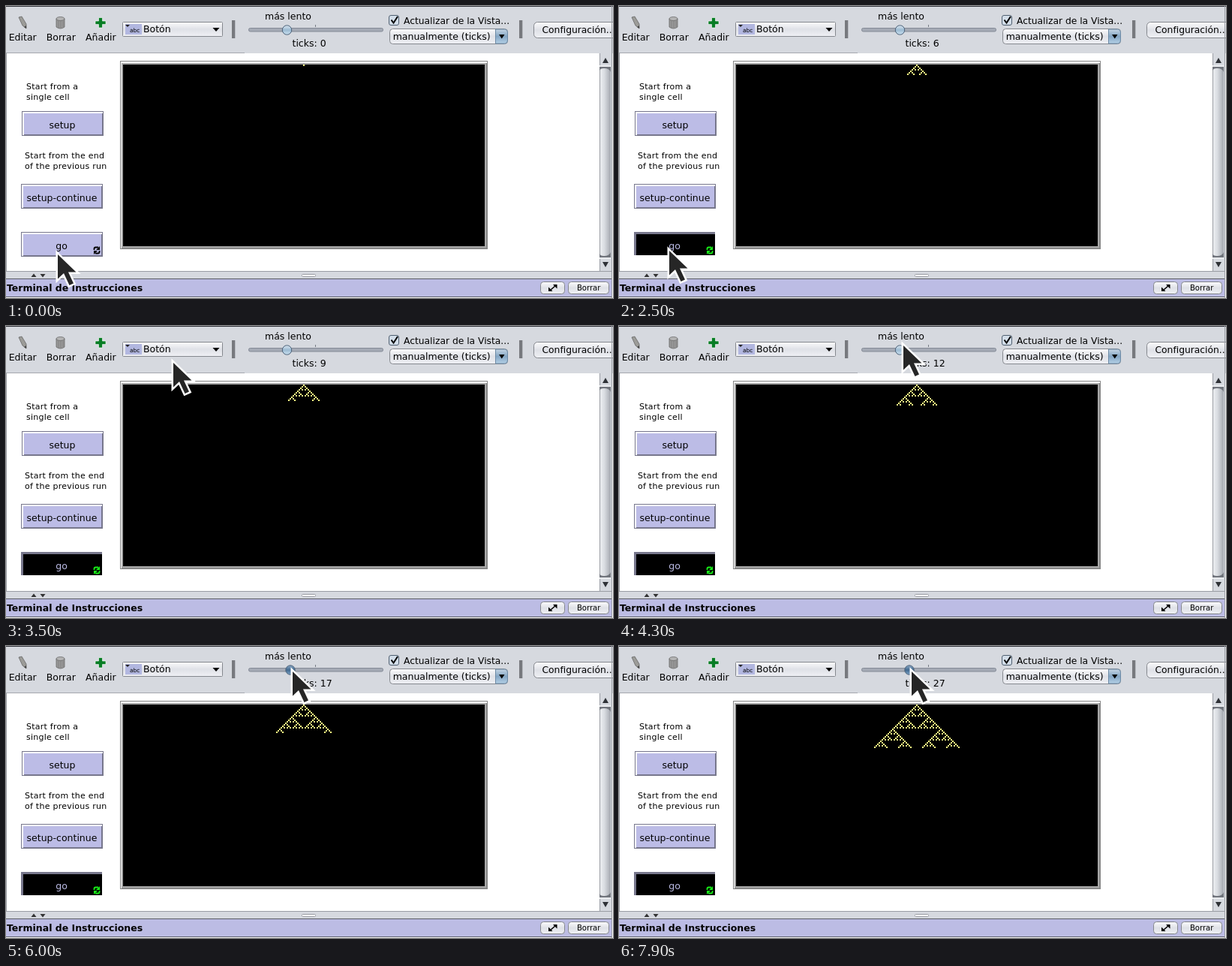
Write an HTML page that moves like this. It is 809x389 px and loops after 8 s.

```html
<!DOCTYPE html>
<html lang="es">
<head>
<meta charset="utf-8">
<title>Cellular automaton</title>
<style>
  html, body { margin: 0; width: 100%; height: 100%; overflow: hidden; background: #fff; }
  svg { display: block; width: 809px; height: 389px; }
  text { font: 12.5px "DejaVu Sans", sans-serif; fill: #000; white-space: pre; }
  .note { font-size: 11px; letter-spacing: .25px; }
  .small { font-size: 10px; }
  .bold { font-weight: bold; }
  .mid { text-anchor: middle; }
  .crisp { shape-rendering: crispEdges; }
  .nimbus { fill: url(#button); stroke: #85888e; }
  .pressed .up, .down { display: none; }
  .pressed .down { display: inline; }
  .pressed text { fill: #bcbce6; }
  .loop { color: #000; }
  .pressed .loop { color: #18f018; }
</style>
</head>
<body>
<svg viewBox="0 0 809 389">
  <defs>
    <linearGradient id="button" x2="0" y2="1">
      <stop offset="0" stop-color="#fbfbfc"/><stop offset=".5" stop-color="#dfe1e7"/><stop offset="1" stop-color="#eff0f4"/>
    </linearGradient>
    <linearGradient id="blue" x2="0" y2="1">
      <stop offset="0" stop-color="#c5d5e4"/><stop offset=".5" stop-color="#84a6c4"/><stop offset="1" stop-color="#b4d0e6"/>
    </linearGradient>
    <linearGradient id="thumb">
      <stop offset="0" stop-color="#eceef1"/><stop offset=".4" stop-color="#d9dce1"/><stop offset="1" stop-color="#a4a8b0"/>
    </linearGradient>
    <linearGradient id="knobLight" x2="0" y2="1">
      <stop offset="0" stop-color="#dbe6f0"/><stop offset=".5" stop-color="#9cbbd3"/><stop offset="1" stop-color="#cbe2f2"/>
    </linearGradient>
    <linearGradient id="knobDark" x2="0" y2="1">
      <stop offset="0" stop-color="#8aa8c6"/><stop offset=".5" stop-color="#41698f"/><stop offset="1" stop-color="#7ba4c8"/>
    </linearGradient>
    <g id="raised" class="crisp">
      <path fill="#77778c" d="M0 0h109v33h-109z"/>
      <path fill="#fff" d="M1 1h107v2h-105v29h-2z"/>
      <path fill="#bcbce6" d="M3 3h104v28h-104z"/>
    </g>
    <g id="turn">
      <path d="M117.500 325v-1.500q0-2 2-2h3.500" fill="none" stroke="currentColor" stroke-width="1.800"/>
      <path d="M125 320v5h-5z" fill="currentColor"/>
    </g>
  </defs>

  <!-- toolbar -->
  <g class="crisp">
    <path fill="#fff" d="M0 0h809v389h-809z"/>
    <path fill="#d6d9df" d="M0 0h809v63h-809z"/>
    <path fill="#33353d" d="M0 0h809v1h-809z"/>
    <path fill="#a5a8af" d="M0 62h318v1h-318z"/>
    <path fill="#77797e" d="M301 19h5v24h-5zM684 19h5v24h-5z"/>
    <path fill="#b8bbc1" d="M305 19h1v24h-1zM688 19h1v24h-1z"/>
  </g>
  <path d="M17 15l4-1 6 10 0 6-5-4z" fill="#9c9c98" stroke="#666" stroke-width=".8"/>
  <path d="M24 28l3 2 0-4z" fill="#444"/>
  <g stroke="#666" stroke-width=".8">
    <path d="M67 17v11q5.500 4 11 0v-11z" fill="#999"/>
    <ellipse cx="72.500" cy="17" rx="5.500" ry="2.500" fill="#b4b4b4"/>
    <path d="M70 20v9M73 20v9M76 20v8" stroke="#7b7b7b"/>
  </g>
  <path d="M123.500 15.500h5v4.500h4.500v4.500h-4.500v4.500h-5v-4.500h-4.500v-4.500h4.500z" fill="#087d25" stroke="#fff" stroke-width=".6"/>
  <text x="3.700" y="46">Editar</text>
  <text x="53.700" y="46">Borrar</text>
  <text x="106" y="46">Añadir</text>

  <rect class="nimbus" x="155.500" y="21.500" width="133" height="19" rx="1"/>
  <path class="crisp" fill="#b2b7e0" d="M159 24h22v14h-22z"/>
  <path d="M159 25l3 3 3-3z" fill="#222"/>
  <text x="165" y="35" style="font-size:7.5px">abc</text>
  <text x="183" y="35">Botón</text>
  <path d="M275.500 29h9l-4.500 5z"/>

  <text x="345" y="18">más lento</text>
  <rect x="323.500" y="29.500" width="179" height="4.500" rx="2" fill="#a4aab5" stroke="#858b97"/>
  <path class="crisp" fill="#767b84" d="M412 25h1v3h-1z"/>
  <circle id="knob" cy="32" r="6.200" stroke="#4c6178"/>
  <text id="ticks" x="381.500" y="54">ticks: 0</text>

  <rect x="510.500" y="12.500" width="13" height="13" rx="2.500" fill="#d3dee9" stroke="#4f5f70"/>
  <path d="M513.500 18.500l3 4 5.500-8.500" fill="none" stroke="#000" stroke-width="2"/>
  <text x="530" y="24" style="font-size:12.300px">Actualizar de la Vista...</text>
  <rect class="nimbus" x="511.500" y="30.500" width="157" height="20" rx="4"/>
  <path d="M652.500 31h12q4 0 4 4v11q0 4-4 4h-12z" fill="url(#blue)" stroke="#6c8aa6"/>
  <path d="M657 38h7.500l-3.750 5.500z"/>
  <text x="515.700" y="45">manualmente (ticks)</text>
  <rect class="nimbus" x="703.500" y="21.500" width="120" height="21" rx="5"/>
  <text x="714.500" y="36" style="font-size:12.300px">Configuración..</text>

  <!-- scrollbar and window edges -->
  <g class="crisp">
    <path fill="#d6d9df" d="M791 63h16v290h-16z"/>
    <path fill="#9a9da4" d="M0 63h1v290h-1zM791 63h1v290h-1zM807 0h1v389h-1z"/>
  </g>
  <rect x="792" y="83" width="14" height="250" fill="url(#thumb)"/>
  <path d="M791 80h15v8q-2-5-9-5-5 0-6 3zM791 336h15v-8q-2 5-9 5-5 0-6-3z" fill="#70747c"/>
  <path d="M791 79h15v2h-15zM791 335h15v2h-15z" fill="#e9ebee"/>
  <path d="M795 76h8l-4-7zM795 341h8l-4 7z" fill="#2e3136"/>

  <!-- widgets -->
  <text class="note" x="27" y="111">Start from a</text>
  <text class="note" x="27" y="125">single cell</text>
  <use href="#raised" x="21" y="140"/>
  <text class="mid" x="75" y="163">setup</text>
  <text class="note" x="25" y="203">Start from the end</text>
  <text class="note" x="25" y="217">of the previous run</text>
  <use href="#raised" x="20" y="237"/>
  <text class="mid" x="74.500" y="260">setup-continue</text>
  <g id="go">
    <use class="up" href="#raised" x="20" y="301"/>
    <g class="down crisp">
      <path fill="#77778c" d="M20 301h108v31h-108z"/>
      <path fill="#000" d="M23 304h105v28h-105z"/>
    </g>
    <text class="mid" x="74" y="324">go</text>
    <g class="loop">
      <use href="#turn"/>
      <use href="#turn" transform="rotate(180 121 325.500)"/>
    </g>
  </g>

  <!-- world view -->
  <g class="crisp">
    <path fill="#858585" d="M152 73h490v251h-490z"/>
    <path fill="#fff" d="M153 74h488v249h-488z"/>
    <path fill="#8b8b8b" d="M154 321h485v-245h2v247h-487z"/>
    <path fill="#a8a8a8" d="M154 76h486v246h-486z"/>
    <path fill="#000" d="M156 78h482v242h-482z"/>
    <path id="cells" fill="#f4f484"/>
  </g>

  <!-- command bar -->
  <g class="crisp">
    <path fill="#d6d9df" d="M0 353h807v10h-807z"/>
    <path fill="#9a9da4" d="M0 353h807v1h-807z"/>
    <path fill="#bcbce4" d="M0 363h807v25h-807z"/>
    <path fill="#5b5d66" d="M0 363h807v1h-807zM0 387h807v1h-807z"/>
  </g>
  <path d="M33.500 361h7l-3.500-4.500zM45.500 357h7l-3.500 4.500z" fill="#333"/>
  <rect x="394.500" y="357.500" width="18" height="3" rx="1" fill="#fff" stroke="#9a9da4"/>
  <text class="bold" x="1" y="380">Terminal de Instrucciones</text>
  <rect class="nimbus" x="712.500" y="367.500" width="32" height="16" rx="4"/>
  <path d="M729 371h5.500v5.500zM723 380v-5.500l5.500 5.500z"/>
  <path d="M725 379l8-7" stroke="#000" stroke-width="1.600"/>
  <rect class="nimbus" x="749.500" y="367.500" width="54" height="16" rx="4"/>
  <text class="small" x="761" y="379">Borrar</text>

  <path id="cursor" d="M2 6v32.500l8-7.500 7.500 16 5.500-2.500-7-15h10.500z" fill="#262626" stroke="#fff" stroke-width="5" paint-order="stroke"/>
</svg>
<script>
  const LOOP = 8000, FRAME = 100, PRESS = 700, GRAB = 4800;
  const CENTER = 396, TOP = 78, CELL = 2;

  // Times in tenths of a second at which each row appears.
  const rowTimes = [10, 11, 14, 18, 21, 24, 27, 30, 32, 35, 38, 40, 42, 45, 50, 55, 57,
    60, 62, 64, 65, 67, 69, 73, 74, 75, 77, 79];
  // The counter starts at 3 and then rises by one at each later time.
  const tickTimes = [14, 19, 22, 25, 28, 31, 34, 36, 39, 42, 46, 51, 53, 56, 58,
    62, 64, 65, 67, 69, 71, 73, 74, 77, 79];
  const knobKeys = [[0, 374.5], [4700, 374.5], [4800, 375.5], [6000, 379], [7900, 387]];
  const cursorKeys = [[200, 65, 320], [2600, 65, 320], [2700, 58, 300], [2900, 24, 190], [3000, 28, 140],
    [3200, 63, 78], [3300, 63, 78], [3400, 140, 55], [3500, 221, 43], [3700, 290, 22],
    [4000, 336, 10], [4100, 336, 10], [4300, 377, 20], [4400, 377, 20], [4600, 376, 28], [4700, 376, 28]];

  const byId = id => document.getElementById(id);
  const [knob, ticks, go, cells, cursor] = ['knob', 'ticks', 'go', 'cells', 'cursor'].map(byId);
  const passed = (times, t) => times.filter(s => s * 100 <= t).length;

  function along(keys, t) {
    const next = keys.findIndex(k => k[0] > t);
    if (next < 0) return keys[keys.length - 1].slice(1);
    if (next === 0) return keys[0].slice(1);
    const a = keys[next - 1], b = keys[next];
    const p = (t - a[0]) / (b[0] - a[0]);
    return a.slice(1).map((v, i) => v + (b[i + 1] - v) * p);
  }

  // Each row is a row of Pascal's triangle modulo 2.
  function triangle(last) {
    let d = '';
    for (let n = 0; n <= last; n++)
      for (let k = 0; k <= n; k++)
        if ((n & k) === k)
          d += `M${CENTER + (2 * k - n) * CELL} ${TOP + n * CELL}h${CELL}v${CELL}h-${CELL}z`;
    return d;
  }

  function cursorAt(t, knobX) {
    if (t < 200) return [67, 325];
    return t < GRAB ? along(cursorKeys, t) : [knobX + 1, 28];
  }

  function draw(now) {
    const t = Math.floor((now % LOOP) / FRAME) * FRAME;
    const count = passed(tickTimes, t);
    const [knobX] = along(knobKeys, t);
    ticks.textContent = `ticks: ${count && count + 2}`;
    cells.setAttribute('d', triangle(passed(rowTimes, t)));
    go.classList.toggle('pressed', t >= PRESS);
    knob.setAttribute('cx', Math.round(knobX * 2) / 2);
    knob.setAttribute('fill', `url(#${t < GRAB ? 'knobLight' : 'knobDark'})`);
    cursor.setAttribute('transform', `translate(${cursorAt(t, knobX).map(Math.round)})`);
  }

  const start = performance.now();
  function loop() {
    draw(performance.now() - start);
    requestAnimationFrame(loop);
  }
  loop();
</script>
</body>
</html>
```
